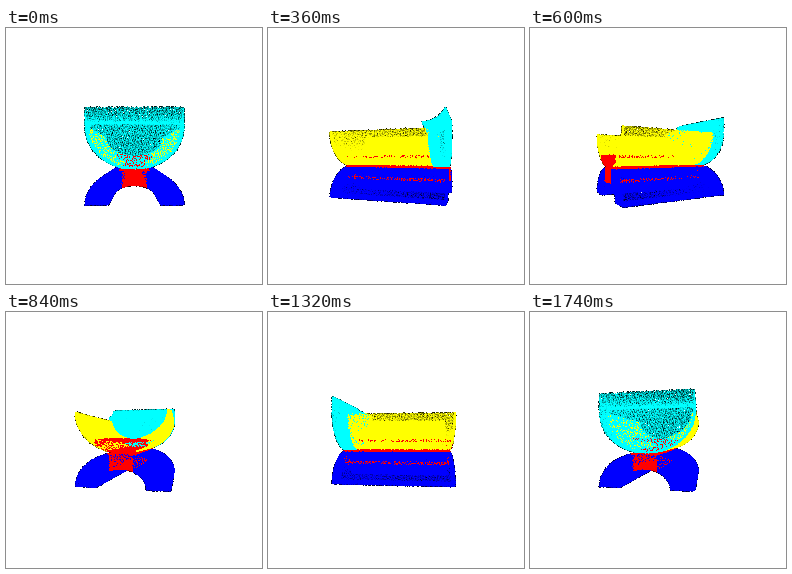
Write a matplotlib script that moves like this. It is 256x256 px and loops after 1.8 s.

```python
import numpy as np
import matplotlib.pyplot as plt
from matplotlib.animation import FuncAnimation

SIZE, FRAMES, STEP = 256, 30, 60
HALF_W, HALF_L, TOP = 37.5, 51, 37.2   # half width, half length, half height
RIM, JOINT, EYE = 22, -10, 210         # trough rim, joint height, camera distance
DENSITY = 1.0                          # points per unit of area
DOT = 0.62                             # opacity of one dot
CYAN, YELLOW, RED, BLUE = range(4)
PALETTE = np.array([[0, 255, 255], [255, 255, 0], [255, 0, 0], [0, 0, 255]])

rng = np.random.default_rng(4)
cloud = []


def spread(area):
    """Evenly scattered (u, v) pairs in the unit square."""
    i = np.arange(1, int(area * DENSITY) + 1)
    shift = 0.37 * len(cloud)
    return (shift + i * 0.7548776662) % 1, (shift + i * 0.5698402910) % 1


def add(x, y, z, colour):
    cloud.append(np.column_stack(np.broadcast_arrays(x, y, z, colour)))


def half_ellipse(u, a, b):
    """Points at even arc length along the upper half of an ellipse."""
    t = np.linspace(0, np.pi, 200)
    run = np.hypot(np.diff(a * np.cos(t)), np.diff(b * np.sin(t)))
    t = np.interp(u * run.sum(), np.r_[0, np.cumsum(run)], t)
    return a * np.cos(t), b * np.sin(t)


def arc_length(a, b):
    return np.pi * np.sqrt((a * a + b * b) / 2)


def ring(a0, b0, a1, b1):
    """Dense points of the flat area between two half ellipses."""
    u, v = spread(np.pi * 1.2 * abs(a0 * b0 - a1 * b1))
    c = np.cos(np.pi * u)
    s = np.sin(np.pi * u)
    return (a0 + (a1 - a0) * v) * c, (b0 + (b1 - b0) * v) * s


def cap_depth(y):
    return 13 + 0.5 * np.clip(y - 17, 0, 10)


def cap_top(depth):
    return 27 + 10 * (1 - np.clip(depth / 18, 0, 1)) ** 2.8


def build():
    deep = RIM - JOINT
    tall = TOP + JOINT

    # Trough, outside and inside
    for a, b, reach in ((HALF_W, deep, 11), (HALF_W - 2, deep - 9, 21)):
        u, v = spread(arc_length(a, b) * 2 * HALF_L)
        x, y = half_ellipse(u, a, b)
        y = RIM - y
        z = HALF_L * (2 * v - 1)
        c = np.where((abs(x) < reach) & (y < 1), RED, YELLOW)
        c = np.where(z > HALF_L - 13, CYAN, c)
        keep = (z < HALF_L - 13) | (a == HALF_W)
        add(x[keep], y[keep], z[keep], c[keep])
    x, y = ring(HALF_W, deep, HALF_W - 2, deep - 9)
    y = RIM - y
    add(x, y, -HALF_L, np.where((abs(x) < 21) & (y < 1), RED, YELLOW))

    # Arch, outside, inside, both ends and feet
    for a, b, reach in ((HALF_W, tall, 12), (20, 15, 9.5)):
        u, v = spread(arc_length(a, b) * 2 * HALF_L)
        x, y = half_ellipse(u, a, b)
        add(x, y - TOP, HALF_L * (2 * v - 1), np.where(abs(x) < reach, RED, BLUE))
    for z in (-HALF_L, HALF_L):
        x, y = ring(HALF_W, tall, 20, 15)
        add(x, y - TOP, z, np.where(abs(x) < 9.5, RED, BLUE))
    for side in (-1, 1):
        u, v = spread((HALF_W - 20) * 2 * HALF_L)
        add(side * (20 + (HALF_W - 20) * u), -TOP, HALF_L * (2 * v - 1), BLUE)

    # Back rest: front and back faces, curved top, side walls
    for back in (False, True):
        high = 27 if back else TOP
        u, v = spread(2 * HALF_W * (high - JOINT))
        x = HALF_W * (2 * u - 1)
        y = JOINT + (high - JOINT) * v
        floor = RIM - deep * np.sqrt(1 - (x / HALF_W) ** 2)
        x, y = x[y > floor], y[y > floor]
        add(x, y, HALF_L - cap_depth(y) * back, CYAN)
    u, v = spread(2 * HALF_W * 22)
    add(HALF_W * (2 * u - 1), cap_top(18 * v), HALF_L - 18 * v, CYAN)
    for side in (-1, 1):
        u, v = spread(18 * (TOP - RIM))
        y, depth = RIM + (TOP - RIM) * u, 18 * v
        keep = (y < cap_top(depth)) & (depth < cap_depth(y))
        add(side * HALF_W, y[keep], HALF_L - depth[keep], CYAN)


def render(frame):
    a = 2 * np.pi * frame / FRAMES
    x, y, z, c = points.T
    xr = x * np.cos(a) + z * np.sin(a)
    zr = z * np.cos(a) - x * np.sin(a)
    scale = EYE / (EYE - zr)
    px = SIZE / 2 + xr * scale
    py = SIZE / 2 - y * scale - 0.5
    ix, iy = np.floor(px).astype(int), np.floor(py).astype(int)
    fx, fy = px - ix, py - iy

    # Each dot covers parts of four pixels
    pix = np.concatenate([(iy + j) * SIZE + ix + i for j in (0, 1) for i in (0, 1)])
    w = DOT * np.concatenate([v * h for v in (1 - fy, fy) for h in (1 - fx, fx)])
    order = np.lexsort((-np.tile(zr, 4), pix))
    pix, w = pix[order], w[order]
    col = np.tile(c, 4).astype(int)[order]

    # Blend from near to far within each pixel
    fade = np.log1p(-w)
    before = np.cumsum(fade) - fade
    first = np.r_[True, pix[1:] != pix[:-1]]
    start = before[first][np.cumsum(first) - 1]
    share = w * np.exp(before - start)
    mix = np.bincount(pix * 4 + col, share, SIZE * SIZE * 4).reshape(-1, 4)
    cover = mix.sum(axis=1)

    # Thinly covered pixels turn dark, empty ones stay white
    light = np.clip((cover - 0.12) / 0.6, 0, 1)
    image = PALETTE[mix.argmax(axis=1)] * light[:, None]
    image[cover < 0.13] = 255
    return image.astype(np.uint8).reshape(SIZE, SIZE, 3)


build()
points = np.vstack(cloud)
points[:, :3] += rng.normal(0, 0.25, (len(points), 3))

fig = plt.figure(figsize=(SIZE / 100, SIZE / 100), dpi=100, facecolor="white")
ax = fig.add_axes([0, 0, 1, 1])
ax.axis("off")
picture = ax.imshow(render(0), interpolation="nearest", aspect="auto")


def update(frame):
    picture.set_data(render(frame))
    return [picture]


anim = FuncAnimation(fig, update, frames=FRAMES, interval=STEP,
                     repeat=True, repeat_delay=0, blit=False)
plt.show()
```
